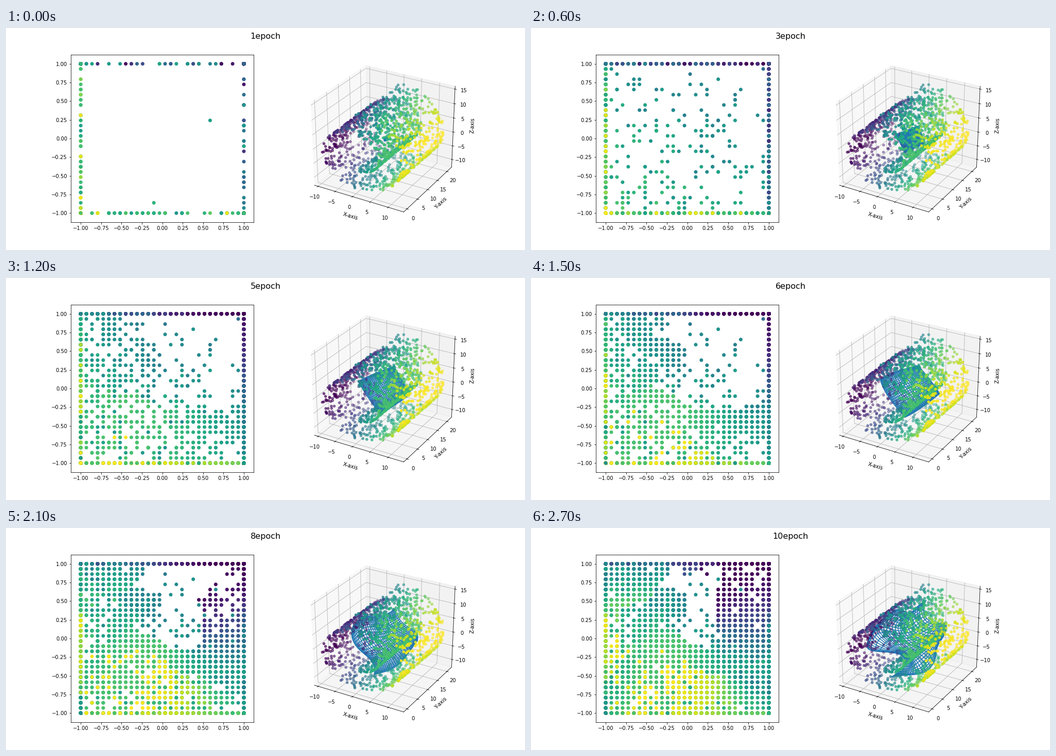
A matplotlib script that plays this animation: 1008x432 px, repeating every 3000 ms.

```python
import numpy as np
import matplotlib.pyplot as plt
from matplotlib.animation import FuncAnimation

EPOCHS = 10
POINTS = 1500
GRID = 30
SIGMA_START, SIGMA_END = 2.0, 0.2


def swiss_roll(n, rng):
    t = 1.5 * np.pi * (1 + 2 * rng.rand(n))
    return np.column_stack([t * np.cos(t), 21 * rng.rand(n), t * np.sin(t)])


def sq_dist(a, b):
    return (a**2).sum(1)[:, None] + (b**2).sum(1)[None] - 2 * a @ b.T


def train(data, rng):
    """Batch SOM: returns the map and the winning nodes of every epoch."""
    axis = np.linspace(-1, 1, GRID)
    nodes = np.stack(np.meshgrid(axis, axis), -1).reshape(-1, 2)

    # random start, leaning so the map diagonals follow width and depth
    x, y, z = ((data - data.mean(0)) / data.std(0)).T
    width, depth = x - 0.25 * z, y + 0.4 * z
    latent = rng.uniform(-0.5, 0.5, (len(data), 2))
    latent += 0.25 * np.column_stack([depth - width, -depth - width])

    maps, winners = [], []
    for epoch in range(EPOCHS):
        sigma = SIGMA_START * (SIGMA_END / SIGMA_START) ** (epoch / EPOCHS)
        h = np.exp(-sq_dist(nodes, latent) / (2 * sigma**2))
        weights = h @ data / h.sum(1, keepdims=True)
        latent = nodes[sq_dist(data, weights).argmin(1)]
        maps.append(weights.reshape(GRID, GRID, 3))
        winners.append(latent)
    return maps, winners


def padded(v):
    """Data range with a 5% margin plus the gap to the box walls."""
    lo, hi = v.min(), v.max()
    pad = 0.05 * (hi - lo)
    gap = (hi - lo + 2 * pad) / 48
    return lo - pad - gap, hi + pad + gap


rng = np.random.RandomState(0)
roll = swiss_roll(POINTS, rng)
maps, winners = train(roll, rng)
shade = roll[:, 0]

fig = plt.figure(figsize=(14, 6), dpi=72)
fig.subplots_adjust(left=0.125, right=0.9, bottom=0.125, top=0.88, wspace=0.2)
title = fig.suptitle("", fontsize=16)

flat = fig.add_subplot(121)
dots = flat.scatter(*winners[0].T, c=shade)
flat.set_xlim(-1.1208, 1.1208)
flat.set_ylim(-1.1227, 1.1227)

cube = fig.add_subplot(122, projection="3d")
# let the box fill the whole subplot as a stretched unit cube
cube.apply_aspect = lambda position=None: None
cube.set_box_aspect((1, 1, 1), zoom=3**0.5 / 1.8294640721620434)
cube.view_init(elev=30, azim=-60)
cube.scatter(*roll.T, c=shade)
meshes = [cube.plot_wireframe(*np.moveaxis(m, -1, 0)) for m in maps]
cube.set(
    xlim=padded(roll[:, 0]), ylim=padded(roll[:, 1]), zlim=padded(roll[:, 2]),
    xticks=range(-10, 11, 5), yticks=range(0, 21, 5), zticks=range(-10, 16, 5),
    xlabel="X-axis", ylabel="Y-axis", zlabel="Z-axis",
)


def update(i):
    title.set_text(f"{i + 1}epoch")
    # winners of earlier epochs stay visible underneath
    dots.set_offsets(np.concatenate(winners[:i + 1]))
    dots.set_array(np.tile(shade, i + 1))
    for k, mesh in enumerate(meshes):
        mesh.set_visible(k == i)


anim = FuncAnimation(fig, update, frames=EPOCHS, interval=300, repeat=True)
plt.show()
```
